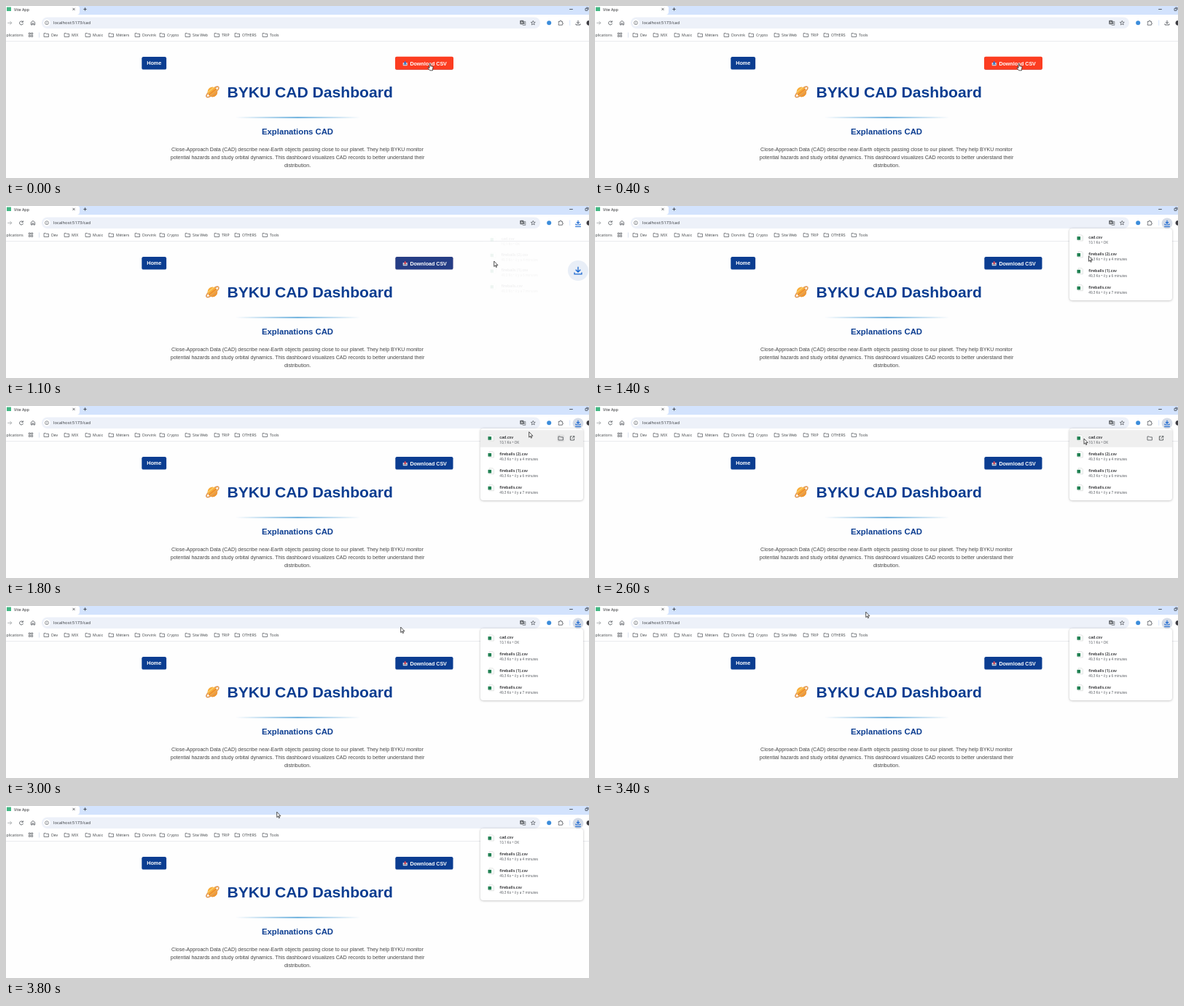
An HTML page with a canvas for the animation above (3.9 s loop, 800x237 px).

```html
<!DOCTYPE html>
<html lang="en">
<head>
<meta charset="utf-8">
<title>CAD Dashboard</title>
<style>
  html, body { margin: 0; width: 100%; height: 100%; overflow: hidden; background: #fefefe; }
  canvas { display: block; }
</style>
</head>
<body>
<canvas id="stage" width="800" height="237"></canvas>
<script>
const ctx = document.getElementById('stage').getContext('2d');
const LOOP = 3900, STEP = 100;
const UI = '"Open Sans", "Noto Sans", sans-serif';
const PAGE = '"Liberation Sans", Arial, sans-serif';
const NAVY = '#0b3d91', RED = '#fc3d21', BLUE = '#1a68d1', GREY = '#50545a';

const clamp = v => Math.max(0, Math.min(1, v));
const phase = (t, from, to) => clamp((t - from) / (to - from));
const smooth = p => p * p * (3 - 2 * p);
const mix = (a, b, p) => a + (b - a) * p;

function box(x, y, w, h, fill, r = 0) {
  ctx.fillStyle = fill;
  ctx.beginPath();
  ctx.roundRect(x, y, w, h, r);
  ctx.fill();
}

function disc(x, y, r, fill) {
  ctx.fillStyle = fill;
  ctx.beginPath();
  ctx.arc(x, y, r, 0, Math.PI * 2);
  ctx.fill();
}

function stroke(d, x, y, color = GREY, width = 0.8, scale = 1) {
  ctx.save();
  ctx.translate(x, y);
  ctx.scale(scale, scale);
  ctx.strokeStyle = color;
  ctx.lineWidth = width;
  ctx.stroke(new Path2D(d));
  ctx.restore();
}

function text(s, x, y, size, { color = '#3c4043', weight = 400, family = UI, align = 'left' } = {}) {
  ctx.font = `${weight} ${size}px ${family}`;
  ctx.fillStyle = color;
  ctx.textAlign = align;
  ctx.fillText(s, x, y);
}

function withAlpha(alpha, draw) {
  if (alpha <= 0) return;
  ctx.save();
  ctx.globalAlpha *= alpha;
  draw();
  ctx.restore();
}

// Icon outlines, centred on the origin
const FOLDER = 'M-3.2 -2.4H-.8L0 -1.5H3.2V2.6H-3.2Z';
const ARROW = 'M-2.8 0H2.8M.4 -2.4L2.8 0L.4 2.4';
const RELOAD = 'M2.1 -1.3A2.5 2.5 0 1 0 2.5 .7M2.4 -3V-1H.4';
const HOUSE = 'M-2.6 2.8V-.7L0 -2.8L2.6 -.7V2.8H.8V.6H-.8V2.8Z';
const STAR = 'M0 -3L.8 -1L3 -.9L1.3 .5L1.9 2.7L0 1.5L-1.9 2.7L-1.3 .5L-3 -.9L-.8 -1Z';
const PUZZLE = 'M-2.8 -1.8H-.8V-2.4A.9 .9 0 0 1 1 -2.4V-1.8H2.4V.1H3A.9 .9 0 0 1 3 1.7H2.4V3H-2.8V1.4A1 1 0 0 0 -2.8 -.4Z';
const DOWNLOAD = 'M0 -3.2V1.2M-2 -.8L0 1.2L2 -.8M-3 1.5V3H3V1.5';
const OPEN = 'M-.3 -2.6H-2.6V2.6H2.6V.3M.8 -2.8H2.8V-.8M2.7 -2.7L-.5 .5';

function browser(t) {
  box(0, 0, 800, 49, '#ffffff');
  box(96, 0, 704, 12, '#d3e3fd');
  box(92, 0, 9, 12, '#ffffff', [0, 3, 4, 0]);
  box(1, 1.5, 6, 5.5, '#41b883');
  text('Vite App', 11, 6.6, 5.4, { color: '#202124' });
  stroke('M-1.6 -1.6L1.6 1.6M1.6 -1.6L-1.6 1.6', 93, 4.4, '#303338', 0.7);
  stroke('M-2.2 0H2.2M0 -2.2V2.2', 108.5, 4.4, '#303338', 0.8);
  stroke('M-2.3 0H2.3', 775.5, 4.5, '#303338', 0.8);
  stroke('M-2 -1H1V2H-2ZM-.9 -2.1H2.1V.9', 797, 4.3, '#303338', 0.7);

  stroke(ARROW, 5, 23.3, '#9a9da1');
  stroke(RELOAD, 21, 23.3);
  stroke(HOUSE, 37, 23.2);
  box(49, 15.5, 684, 15.5, '#edf1f9', 7.7);
  disc(56, 23.2, 4.8, '#ffffff');
  stroke('M2.5 0A2.5 2.5 0 1 1 -2.5 0A2.5 2.5 0 1 1 2.5 0M0 -.4V1.4M0 -1.5V-.8', 56, 23.2, GREY, 0.6);
  text('localhost:5173/cad', 65, 25.3, 5.85, { color: '#303338' });

  box(705.3, 19.7, 5, 5.6, '#5f6368', 0.7);
  stroke('M-1.7 -1.6H2.8V3.4H-1.2M-.2 .2H2M.9 -.6V.2L-.2 2M.4 .8L2 2.2', 710, 23, GREY, 0.6);
  text('A', 707.7, 24, 4, { color: '#ffffff', weight: 600, align: 'center' });
  stroke(STAR, 723.3, 23.3, GREY, 0.7);
  disc(745.2, 23.2, 3, '#3c8ddb');
  stroke(PUZZLE, 761, 23.2);
  box(773.3, 19.5, 0.9, 7.5, '#d3e3fd');
  const started = t >= 900;
  if (t >= 1200) disc(785, 23.8, 7.4, '#d5dce8');
  stroke(DOWNLOAD, 785, 23, started ? BLUE : GREY, started ? 1.1 : 0.9);
  if (started) box(781, 28, 8, 1, BLUE, 0.5);
  disc(800, 23.3, 3.4, '#3d3c42');

  text('Applications', 23.6, 41.7, 5.2, { align: 'right' });
  for (let i = 0; i < 4; i++)
    stroke('M0 0H2V2H0Z', 31.3 + (i % 2) * 3.4, 37 + (i >> 1) * 3.4, GREY, 0.7);
  box(45, 36.5, 0.7, 7, '#c6d3e6');
  const bookmarks = { Dev: 62, MIX: 90, Music: 119, 'Métiers': 151, Dorvink: 187, Crypto: 221,
    'Site Web': 256, TRIP: 296, OTHERS: 324, Tools: 362 };
  for (const [label, x] of Object.entries(bookmarks)) {
    stroke(FOLDER, x - 6.7, 39.9, GREY, 0.7);
    text(label, x, 41.7, 5.2);
  }
  box(0, 48.2, 800, 0.8, '#e2e5e9');
}

function planet(x, y) {
  const ring = (from, to) => {
    ctx.beginPath();
    ctx.ellipse(0, 0, 10.6, 3.2, 0, from, to);
    ctx.strokeStyle = '#e39a55';
    ctx.lineWidth = 1.6;
    ctx.stroke();
  };
  ctx.save();
  ctx.translate(x, y);
  ctx.rotate(-0.68);
  ring(Math.PI, Math.PI * 2);
  ctx.save();
  disc(0, 0, 6.8, '#f8ab38');
  ctx.clip();
  box(-8, -4.6, 16, 1.8, '#fcc861');
  box(-8, -0.8, 16, 1.5, '#ea8c33');
  box(-8, 4, 16, 3, '#ee9632');
  ctx.restore();
  ring(0, Math.PI);
  ctx.restore();
}

function inbox(x, y, arrow) {
  box(x - 3, y - 1.3, 6, 4.3, '#dfe4ee', 0.7);
  box(x - 2.2, y + 0.6, 4.4, 1.5, '#6c7a95', 0.4);
  stroke('M0 -3.3V.2M-1.5 -1.2L0 .4L1.5 -1.2', x, y, arrow, 1.3);
}

function page(t) {
  box(0, 49, 800, 188, '#fefefe');
  const label = { color: '#ffffff', weight: 700, family: PAGE };
  box(186.3, 70, 33.8, 17.6, NAVY, 2.2);
  text('Home', 203.2, 81.2, 7.2, { ...label, align: 'center' });

  const hover = 1 - phase(t, 850, 1130);
  box(534.3, 70, 79.2, 17.6, NAVY, 2.2);
  withAlpha(hover, () => box(534, 69.8, 80, 18, RED, 2.2));
  inbox(547.7, 79.2, hover > 0.5 ? '#2d74d2' : '#df4652');
  text('Download CSV', 554.4, 81.5, 7.1, label);

  planet(283.4, 118.4);
  const title = { color: NAVY, weight: 700, family: PAGE };
  text('BYKU CAD Dashboard', 303.4, 125.5, 21.1, title);

  const rule = ctx.createLinearGradient(315, 0, 486, 0);
  rule.addColorStop(0, 'rgba(86,165,216,0)');
  rule.addColorStop(0.5, 'rgba(86,165,216,1)');
  rule.addColorStop(1, 'rgba(86,165,216,0)');
  box(315, 152.8, 171, 1.6, rule);

  text('Explanations CAD', 400, 176.7, 11.3, { ...title, align: 'center' });
  const lines = [
    'Close-Approach Data (CAD) describe near-Earth objects passing close to our planet. They help BYKU monitor',
    'potential hazards and study orbital dynamics. This dashboard visualizes CAD records to better understand their',
    'distribution.'
  ];
  lines.forEach((line, i) =>
    text(line, 400, 199.5 + i * 11.27, 7.09, { color: '#444444', family: PAGE, align: 'center' }));
}

function downloads(t, cursor) {
  const open = phase(t, 1090, 1230);
  withAlpha(open, () => {
    const scale = mix(0.943, 1, open);
    ctx.translate(721.5, 80);
    ctx.scale(scale, scale);
    ctx.translate(-721.5, -80);

    ctx.save();
    ctx.shadowColor = `rgba(0,0,0,${0.28 * open})`;
    ctx.shadowBlur = 3;
    ctx.shadowOffsetY = 0.5;
    box(651, 31, 141, 99, '#ffffff', 4);
    ctx.restore();

    const hovered = cursor.x > 651 && cursor.x < 792 && cursor.y > 33 && cursor.y < 57;
    if (hovered) {
      box(651, 33.3, 141, 23.4, '#efefef');
      if (t < 2100) box(756.3, 39.4, 10, 10, '#e2e2e2', 2);
      stroke(FOLDER, 761.2, 44.4);
      stroke(OPEN, 777, 44.4, '#3c4043');
    }
    const files = [
      ['cad.csv', '10,1 Ko • OK'],
      ['fireballs (2).csv', '49,3 Ko • il y a 4 minutes'],
      ['fireballs (1).csv', '49,3 Ko • il y a 6 minutes'],
      ['fireballs.csv', '49,3 Ko • il y a 7 minutes']
    ];
    files.forEach(([name, detail], i) => {
      const y = 44 + i * 22.9;
      box(663, y - 4, 6.5, 8, '#ffffff', 0.5);
      stroke('M-3 -4H2L3.4 -2.6V4H-3Z', 666, y, '#c4c9c6', 0.5);
      box(661.5, y - 1.9, 4.6, 4.6, '#1f8051');
      text(name, 677.2, y + 1.1, 5.45, { color: '#202124', weight: 600 });
      text(detail, 677.2, y + 8.4, 4.7, { color: '#50545a' });
    });
  });
}

function badge(t) {
  const y = mix(130, 48, phase(t, 900, 1300));
  withAlpha(Math.min(phase(t, 850, 1050), 1 - phase(t, 1150, 1350)), () => {
    disc(785, y, 14, '#e8eef7');
    stroke(DOWNLOAD, 785, y, BLUE, 0.8, 1.65);
  });
}

// Pointer stops: time, x, y
const stops = [[0, 581, 79], [700, 581, 79], [1100, 669.7, 76], [1300, 670, 75], [1700, 717.7, 35.7],
  [2000, 717.7, 35.7], [2500, 671, 45], [2750, 671, 45], [3300, 371.7, 8.2], [LOOP, 371.7, 8.2]];

function pointerAt(t) {
  const i = stops.findIndex(s => s[0] > t);
  const [a, b] = [stops[i - 1], stops[i]];
  const p = smooth(phase(t, a[0], b[0]));
  return { x: mix(a[1], b[1], p), y: mix(a[2], b[2], p) };
}

function pointer({ x, y }) {
  const onButton = x > 534 && x < 614 && y > 70 && y < 88;
  const shape = new Path2D(onButton
    ? 'M0 .4Q.7 -.3 1.3 .5V3.6L4.3 4.2Q5.1 4.5 5 5.5L4.5 8.2V9.8H.6L-2 6.4Q-1.8 5.2 -.9 5.8L0 6.5Z'
    : 'M0 0V7.4L1.7 5.9L2.8 8.5L3.9 8L2.8 5.5H5.2Z');
  ctx.save();
  ctx.translate(x, y);
  ctx.fillStyle = '#ffffff';
  ctx.strokeStyle = '#1c1c1c';
  ctx.lineWidth = 0.75;
  ctx.fill(shape);
  ctx.stroke(shape);
  ctx.restore();
}

function draw(now) {
  const t = Math.floor((now % LOOP) / STEP) * STEP;
  const cursor = pointerAt(t);
  browser(t);
  page(t);
  downloads(t, cursor);
  badge(t);
  pointer(cursor);
}

const start = performance.now();
function tick() {
  draw(performance.now() - start);
  requestAnimationFrame(tick);
}
tick();
</script>
</body>
</html>
```
